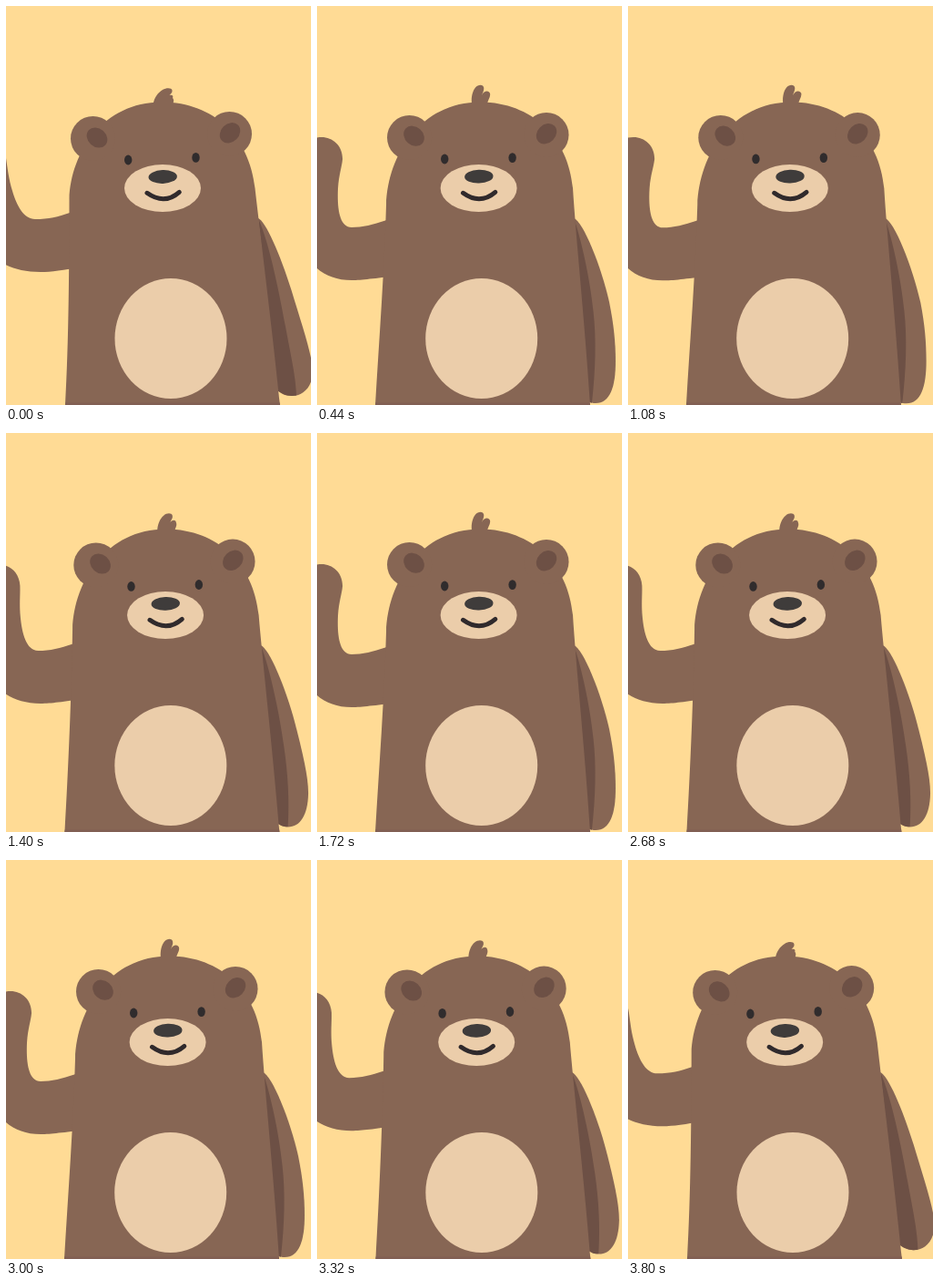
Animation, 335 px wide and 438 px high, one loop 3840 ms. Source, as an HTML page:

```html
<!DOCTYPE html>
<html lang="en">
<head>
<meta charset="utf-8">
<title>Waving bear</title>
<style>
  html, body { margin: 0; width: 100%; height: 100%; overflow: hidden; background: #ffdb95; }
  svg { display: block; width: 335px; height: 438px; }
  .fur { fill: #876654; }
  .shade { fill: #6d5045; }
  .cream { fill: #ebcdaa; }
  .ink { fill: #302c2d; }
  .nose { fill: #3f3c3b; }
  .mouth { fill: none; stroke: #302a2c; stroke-width: 5; stroke-linecap: round; }
  .hem { fill: #815f53; }
</style>
</head>
<body>
<svg id="stage" viewBox="0 0 335 438" xmlns="http://www.w3.org/2000/svg"></svg>
<script>
const LOOP = 3840, STEP = 40, SWAY = 640, LEAD = 10;
const NS = 'http://www.w3.org/2000/svg';
const stage = document.getElementById('stage');
const parts = [];

function add(tag, cls, attrs = {}) {
  const el = document.createElementNS(NS, tag);
  el.setAttribute('class', cls);
  for (const key in attrs) el.setAttribute(key, attrs[key]);
  stage.appendChild(el);
  return el;
}

const mix = (a, b, u) => a + (b - a) * u;

// A path that bends between two poses with the same commands.
function bend(cls, from, to) {
  const el = add('path', cls);
  const target = to.match(/-?[\d.]+/g).map(Number);
  parts.push(u => {
    let i = 0;
    el.setAttribute('d', from.replace(/-?[\d.]+/g, n => mix(+n, target[i++], u).toFixed(2)));
  });
}

// An ellipse that slides between two centres.
function oval(cls, rx, ry, from, to, tilt = 0) {
  const el = add('ellipse', cls, { rx, ry });
  parts.push(u => {
    const x = mix(from[0], to[0], u), y = mix(from[1], to[1], u);
    el.setAttribute('transform', `translate(${x.toFixed(2)} ${y.toFixed(2)}) rotate(${tilt})`);
  });
}

// Hanging arm and its inner side
bend('fur',
  'M277 233 C285 236 301 272 313.5 312 C325 350 337 385 337 402 C336 420 325 428 314 428 C306 428 302 425 298 422 Z',
  'M282 233 C292 236 312 285 321 325 C326 350 328 370 328 390 C328 418 322 436 306 436 C303 436 301 435.5 298 434 Z');
bend('shade',
  'M277 233 C290 262 301 320 307 352 C313 385 318 405 319 427.5 C309 429 304 426 298 422 Z',
  'M282 233 C290 255 300 300 303.5 335 C307 365 306 400 302 435.5 C301 436 300 435 298 434 Z');

// Waving arm
bend('fur',
  'M85 222 L70 227 C57 231.5 47 234 32 234 C20 234 12 220 7 203 C3 190 2 180 0 167 C-2 152 -13 144 -24 146 C-39 148 -48 159 -46 172 C-42 198 -40 220 -32 245 C-25 270 -5 292 38 292 C50 292 62 290 85 286 Z',
  'M90 230 L75 235.5 C62 240 50 243 38 243 C24 243 22 220 23 200 C24 185 27 178 28 168 C28 153 17 144 5 144 C-10 144 -19 155 -19 168 C-22 195 -22 220 -19 250 C-15 280 5 301 38 301 C50 301 62 299 90 296 Z');

// Tuft, head and body
bend('fur',
  'M161.5 108 C163 100 167 95 172 92 C176 89.5 182 89.5 182.5 92.5 C183 95 181 96 179.5 98 C183 97 184 99 183 101 C185 103 184 106 183 108 Z',
  'M170 108 C169 100 171 93 174 89.5 C177 86 182 86 183 89 C184 92 182 95 181 98 C184 92 189 93 190 96 C191 100 187 104 187 108 Z');
bend('fur',
  'M65 438 C69 370 69.5 280 69.5 212 C71 160 108 104.5 172 105.5 C228 106 267 143 273.5 200 C278 240 292 350 301 438 Z',
  'M64 438 C68 370 74 290 76 218 C78 163 114 105 180 105.5 C236 106 276 144 281 200 C284 250 294 345 300 438 Z');
bend('hem',
  'M65.2 435.5 L300.7 435.5 L301 438 L65 438 Z',
  'M64.2 435.5 L299.7 435.5 L300 438 L64 438 Z');
oval('cream', 61.5, 66, [181, 365], [180.7, 365]);

// Ears
oval('fur', 24.5, 24.5, [95.5, 145.5], [101.5, 144.5]);
oval('fur', 24.5, 24.5, [245.5, 140.5], [252, 141.5]);
oval('shade', 12.3, 10, [100, 144.5], [106.5, 142.7], 42);
oval('shade', 12.3, 10, [246, 139.3], [252, 140.2], -45);

// Face
oval('cream', 42, 26, [172, 200], [177.6, 200]);
oval('ink', 4.2, 5.4, [134.2, 169], [140.2, 168]);
oval('ink', 4.2, 5.4, [208.5, 166.4], [214.6, 166.6]);
oval('nose', 15.7, 7.4, [172.2, 187.5], [177.8, 187.2], -2);
bend('mouth', 'M155 205.3 Q174 218.7 190.3 204.3', 'M160.5 205.3 Q179 218.7 195.8 204.3');

const wave = t => Math.cos(2 * Math.PI * (t + LEAD) / SWAY);

function draw(ms) {
  const t = Math.floor((ms % LOOP) / STEP) * STEP;
  // every second sway reaches slightly further
  const reach = Math.floor(t / SWAY) % 2 ? 0.81 : 0.78;
  const u = (wave(0) - wave(t)) * reach;
  for (const move of parts) move(u);
}

const start = performance.now();
function tick() {
  draw(performance.now() - start);
  requestAnimationFrame(tick);
}
draw(0);
requestAnimationFrame(tick);
</script>
</body>
</html>
```
